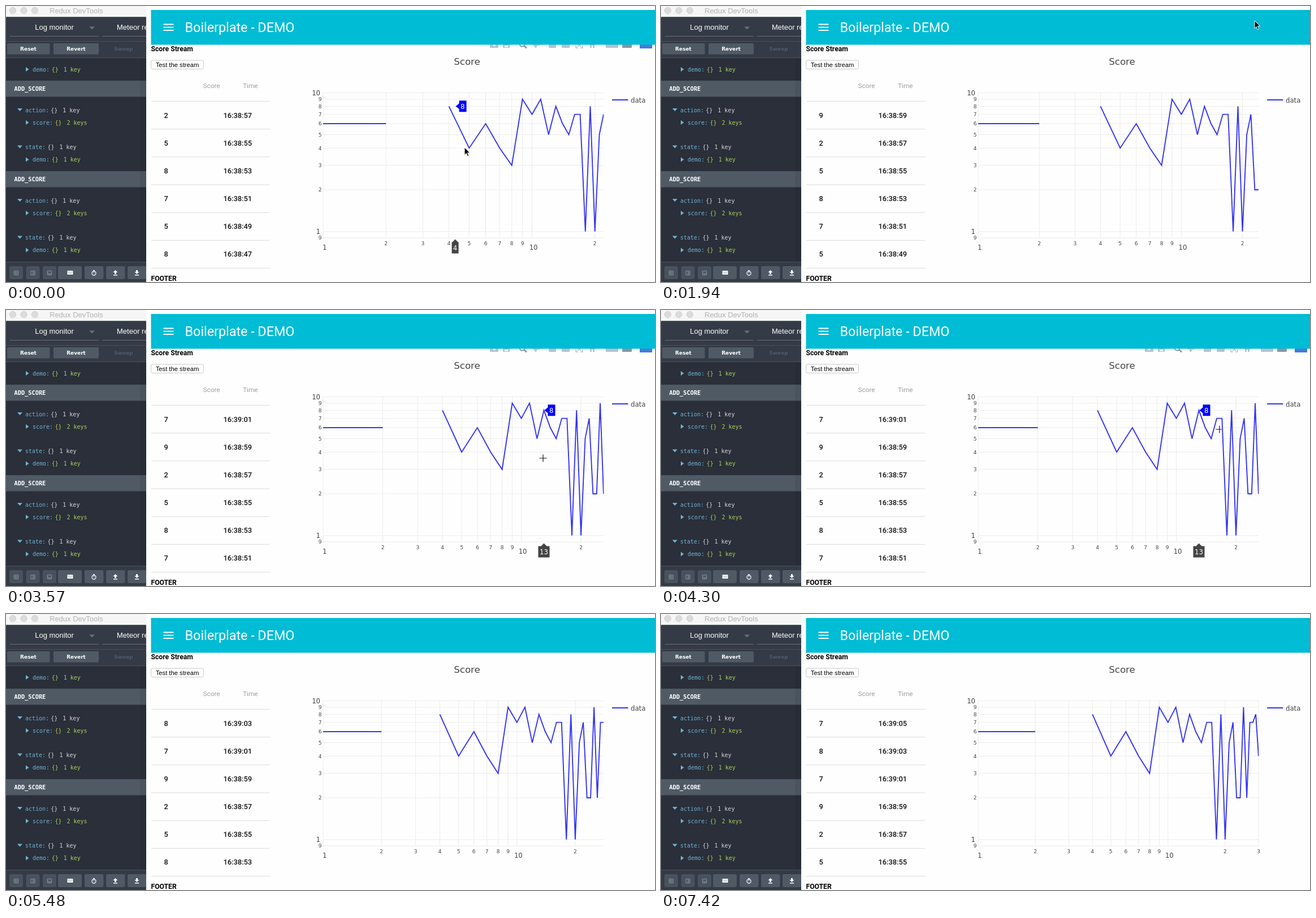
These frames come from a looping animation (1148 by 488 pixels, 8000 ms). An HTML page:

```html
<!DOCTYPE html>
<html lang="en">
<head>
<meta charset="utf-8">
<title>Score stream</title>
<style>
html, body { margin: 0; width: 100%; height: 100%; overflow: hidden; background: #fefefe; }
svg { display: block; }
.mono { font: 10px "DejaVu Sans Mono", monospace; }
.name { font: bold 10.3px "DejaVu Sans Mono", monospace; }
.arial { font: 13px "Liberation Sans", Arial, sans-serif; }
.tool { font: bold 9px "DejaVu Sans", sans-serif; }
.bold { font: 700 12.2px Roboto, sans-serif; }
.head { font: 11.8px Roboto, sans-serif; }
.cell { font: 500 12.8px Roboto, sans-serif; }
.major { font: 11.7px "DejaVu Sans", sans-serif; }
.minor { font: 9px "DejaVu Sans", sans-serif; }
</style>
</head>
<body>
<svg id="stage" width="1148" height="488" viewBox="0 0 1148 488">
  <clipPath id="plot"><rect x="560" y="150" width="497.5" height="262"/></clipPath>
  <clipPath id="panel"><rect width="248" height="488"/></clipPath>
  <g id="chart"></g>
  <g id="page"></g>
  <g id="rows"></g>
  <g id="pointer"></g>
</svg>
<script>
const LOOP = 8000, STEP = 148;
// Score per second; 0 has no place on a log scale
const scores = [6, 6, 0, 8, 4, 6, 4, 3, 9, 7, 9, 5, 8, 6, 5, 7, 7, 1, 8, 1, 5, 7, 2, 2, 9, 2, 7, 7, 8, 4, 7];
const ticks = [300, 1340, 2380, 3420, 4450, 5330, 6380, 7420];
// [time, x, y]
const path = [
  [0, 811, 250], [148, 811, 250], [444, 860, 150], [740, 920, 60], [888, 945, 10], [1036, 950, -20],
  [1920, 1050, -20], [1924, 1050, 26], [2072, 1045, 80], [2368, 1020, 220], [2960, 987, 260],
  [3552, 950, 262], [4000, 950, 240], [4292, 988, 211], [4740, 1080, 190], [5180, 1146, 160],
  [5330, 1170, 150], [8000, 1170, 150]
];
// [time, hovered point, points on the chart when it was hovered]
const hovers = [
  [0, 4, 19], [300, 0, 0], [2380, 20, 25], [2830, 19, 25], [3280, 16, 25],
  [3570, 13, 26], [4600, 18, 27], [4750, 0, 0]
];

const text = (x, y, s, cls, fill, anchor = 'start', extra = '') =>
  `<text x="${x}" y="${y}" class="${cls}" fill="${fill}" text-anchor="${anchor}" ${extra}>${s}</text>`;
const rect = (x, y, w, h, fill, extra = '') =>
  `<rect x="${x}" y="${y}" width="${w}" height="${h}" fill="${fill}" ${extra}/>`;
const shape = (d, fill, extra = '') => `<path d="${d}" fill="${fill}" ${extra}/>`;
const stroke = (d, color, width = 1, extra = '') =>
  shape(d, 'none', `stroke="${color}" stroke-width="${width}" ${extra}`);

const BLUE = '#6fb3d2', GREEN = '#a9d158', PALE = '#d3d6da', SLATE = '#4f5a65', NAV = '#353b46';

function treeRow(y, key, count, open) {
  const x = open ? 34 : 47, after = x + key.length * 5.8;
  const color = open ? PALE : GREEN;
  return shape(open ? `M20 ${y - 3}h9l-4.5 5z` : `M35 ${y - 4}v8l5.5 -4z`, BLUE) +
    text(x, y + 3.5, key + ':', 'mono', BLUE) +
    text(after + 10.5, y + 3.5, '{}', 'mono', color) +
    text(after + 31.5, y + 3.5, count, 'mono', color);
}

function logEntry(y) {
  return rect(0, y, 248, 28.5, SLATE) + text(14.5, y + 18, 'ADD_SCORE', 'name', '#fff') +
    treeRow(y + 52, 'action', '1 key', true) + treeRow(y + 74, 'score', '2 keys') +
    treeRow(y + 117.5, 'state', '1 key', true) + treeRow(y + 139.5, 'demo', '1 key');
}

function devPanel() {
  let s = rect(0, 0, 248, 488, '#2a2f3a') + rect(0, 0, 248, 19.5, '#f6f6f6');
  for (const x of [12, 31.5, 51]) s += `<circle cx="${x}" cy="8" r="5.6" fill="#dcdcdc" stroke="#d0d0d0"/>`;
  s += text(77, 13, 'Redux DevTools', 'arial', '#b2b2b2');
  s += rect(0, 19.5, 248, 72, NAV) + stroke('M0 62.5H248M0 91.5H248', '#4a515c');
  s += text(85.5, 42, 'Log monitor', 'arial', '#fff', 'middle') + text(196, 42, 'Meteor re', 'arial', '#fff');
  s += stroke('M7 53.5H164M170 53.5H248', '#6a707a') + shape('M147 36.5h10l-5 5z', '#6a707a');
  s += rect(2, 66, 75.5, 19.5, SLATE, 'rx="2"') + rect(84, 66, 80, 19.5, SLATE, 'rx="2"');
  s += text(39.5, 79, 'Reset', 'tool', '#fff', 'middle') + text(124, 79, 'Revert', 'tool', '#fff', 'middle');
  s += text(208, 79, 'Sweep', 'tool', SLATE, 'middle');
  s += treeRow(112, 'demo', '1 key') + logEntry(132) + logEntry(292);
  s += rect(237, 92, 11, 360, '#000', 'opacity=".07"');
  s += rect(0, 452, 248, 36, NAV) + stroke('M0 452.5H248', '#4a515c');
  for (const [x, w] of [[6, 24], [35.5, 24], [65, 24], [92, 42], [139, 33.5], [177, 33.5], [215, 33.5]])
    s += rect(x, 460, w, 23, w < 30 ? '#48525d' : SLATE, 'rx="3"');
  for (const [x, d] of [[14.5, 'm3 0v7m-3 -3.5h7'], [44, 'm4 0v7m0 -3.5h3'], [73.5, 'm0 4.5h7m-3.5 0v3']])
    s += stroke(`M${x} 468.500h7v7h-7z${d}`, '#8b939c');
  s += rect(108.5, 468, 10, 7, '#fff', 'rx="1"') + stroke('M110 470.500h7M111 473h5', SLATE, 1, 'stroke-dasharray="1 1"');
  s += '<circle cx="155.500" cy="472.500" r="3.500" fill="none" stroke="#fff" stroke-width="1.300"/>' +
    stroke('M154 467.500h3M155.500 470.500v2', '#fff');
  s += shape('M193.500 467l4 4h-2.500v3h-3v-3h-2.500zM190 475h7v1.500h-7z', '#fff');
  s += shape('M231.500 474l-4 -4h2.500v-3h3v3h2.500zM228 475h7v1.500h-7z', '#fff');
  return `<g clip-path="url(#panel)">${s}</g>`;
}

function appPage() {
  let s = rect(256.5, 7, 892, 61.5, '#00bcd4') + stroke('M278.500 32.500h18M278.500 37.800h18M278.500 43h18', '#fff', 2);
  s += text(316.6, 45.5, 'Boilerplate - DEMO', '', '#fff', 'start', 'font-family="Roboto, sans-serif" font-size="23.3"');
  s += text(256.5, 80, 'Score Stream', 'bold', '#000') + text(256.5, 486, 'FOOTER', 'bold', '#000');
  s += rect(256.5, 96, 93, 15.5, '#fff', 'rx="3" stroke="#c6c6c6"');
  s += text(303, 108, 'Test the stream', 'arial', '#000', 'middle', 'style="font-size:11.2px"');
  s += text(348.5, 144.5, 'Score', 'head', '#9e9e9e') + text(419, 144.5, 'Time', 'head', '#9e9e9e');
  for (let i = 0; i < 7; i++) s += rect(257, 168 + i * 49.17, 210, 1, '#dcdcdc');
  return s;
}

function tableRows(last) {
  let s = '';
  for (let i = 0; i < 6; i++) {
    const n = last - 2 * i, sec = n + 34, y = 197.5 + i * 49.17;
    const time = `16:${38 + Math.floor(sec / 60)}:${String(sec % 60).padStart(2, '0')}`;
    s += text(279.5, y, scores[n - 1], 'cell', '#111') + text(384.5, y, time, 'cell', '#111');
  }
  return s;
}

const xAt = (v, count) => 561 + 496 * Math.log(v) / Math.log(count);
const yAt = v => 398.8 - 245.2 * Math.log10(v);

function modebar(opacity) {
  const light = '#b9bfcf', dark = '#8c93a8';
  const icons = [[856, 15, light], [879, 12, light], [960, 13, light], [983, 14, light], [1061, 22, light], [1090, 17, dark]];
  let s = icons.map(([x, w, c]) => rect(x, 62, w, 12, c, 'rx="1.500"')).join('');
  s += '<circle cx="863.500" cy="69" r="2.500" fill="#fefefe"/>' + rect(882, 70, 6, 3, '#fefefe');
  s += `<circle cx="913" cy="67" r="4.500" fill="none" stroke="${dark}" stroke-width="2"/>` + stroke('M916 70l5 4.500', dark, 2.5);
  s += shape('M934 70h6l-3 5z', light) + stroke('M932 69h12M937 62v9', light, 1.5);
  s += stroke('M1008 70v4h4M1020 70v4h-4M1011 72l6 -5M1017 72l-6 -5', light, 1.5);
  s += shape('M1031 69l6 -6 6 6h-2v5h-3v-4h-2v4h-3v-5z', light);
  s += rect(1121, 53, 22, 22, '#447adb');
  return `<g opacity="${opacity}">${s}</g>`;
}

function hoverLabels(n, count) {
  const x = xAt(n, count), y = yAt(scores[n - 1]), half = n > 9 ? 10 : 6;
  return shape(`M${x + 1} ${y}l6 -5v-5h13v20h-13v-5z`, '#00f') +
    text(x + 13.3, y + 4.5, scores[n - 1], 'major', '#fff', 'middle') +
    shape(`M${x} 412.500l5 5h${half - 5}v20h${-2 * half}v-20h${half - 5}z`, '#444') +
    text(x, 432, n, 'major', '#fff', 'middle');
}

function chart(count, hover, barOpacity) {
  let grid = '', labels = '';
  for (const v of [1, 2, 3, 4, 5, 6, 7, 8, 9, 10, 20, 30]) {
    const x = xAt(v, count);
    if (x > 1057.5) continue;
    grid += `M${x} 152V410`;
    labels += v == 1 || v == 10 ? text(x + 2.6, 431, v, 'major', '#444', 'middle')
      : text(x, 422.5, v > 9 ? v / 10 : v, 'minor', '#444', 'middle');
  }
  for (const v of [0.9, 1, 2, 3, 4, 5, 6, 7, 8, 9, 10]) {
    const y = yAt(v);
    grid += `M561 ${y}H1057`;
    labels += v == 1 || v == 10 ? text(556, y + 4.3, v, 'major', '#444', 'end')
      : text(558.5, y + 3.4, v < 1 ? 9 : v, 'minor', '#444', 'end');
  }
  let line = '', pen = 'M';
  scores.slice(0, count).forEach((v, i) => {
    if (v) line += `${pen}${xAt(i + 1, count)} ${yAt(v)}`;
    pen = v ? 'L' : 'M';
  });
  return stroke(grid, '#ececec') + stroke(line, '#3333f5', 1.9, 'clip-path="url(#plot)"') + labels +
    text(815.5, 104, 'Score', '', '#444', 'middle', 'font-family="DejaVu Sans, sans-serif" font-size="16.6"') +
    stroke('M1072 166H1100.500', '#3333f5', 2) + text(1105, 171, 'data', 'major', '#444') +
    modebar(barOpacity) + (hover[1] ? hoverLabels(hover[1], hover[2]) : '');
}

function pointer(t) {
  const i = path.findLastIndex(p => p[0] <= t), [t0, x0, y0] = path[i], [t1, x1, y1] = path[i + 1];
  const k = (t - t0) / (t1 - t0), x = x0 + (x1 - x0) * k, y = y0 + (y1 - y0) * k;
  if (t > 1000 && y > 152 && x < 1058) {
    const d = `M${x - 6.5} ${y}h13M${x} ${y - 6.5}v13`;
    return stroke(d, '#fff', 2.4, 'opacity=".6"') + stroke(d, '#111', 1.2);
  }
  return shape(`M${x} ${y}v13.500l3.200 -3 2.300 5.200 2.200 -1 -2.300 -5h4.300z`, '#000', 'stroke="#fff"');
}

const ramp = (t, from, to) => Math.max(0, Math.min(1, (t - from) / (to - from)));
const drawn = {};
function put(id, markup) {
  if (drawn[id] !== markup) document.getElementById(id).innerHTML = drawn[id] = markup;
}

put('page', appPage() + devPanel());
function frame() {
  const t = performance.now() % LOOP, held = Math.floor(t / STEP) * STEP;
  const count = 22 + ticks.filter(at => at <= t).length;
  const bar = 1 - ramp(held, 450, 750) + ramp(held, 2080, 2380) - ramp(held, 4900, 5300);
  put('chart', chart(count, hovers.findLast(h => h[0] <= t), bar));
  put('rows', tableRows(count + 1));
  put('pointer', pointer(held));
  requestAnimationFrame(frame);
}
frame();
</script>
</body>
</html>
```
